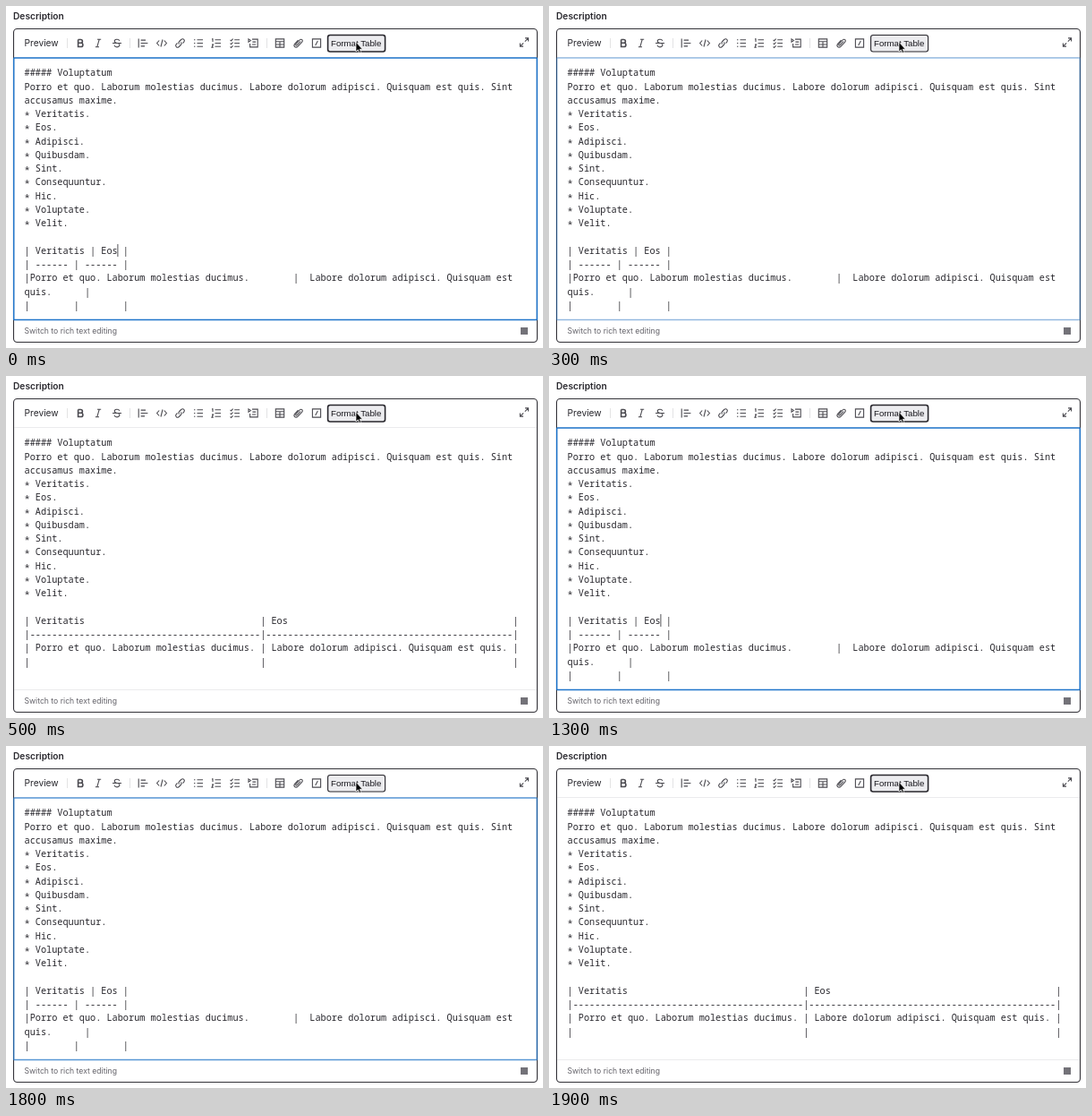
An HTML page that plays this animation: 600 by 382 pixels, repeating every 2.4 s.

```html
<!DOCTYPE html>
<html lang="en">
<head>
<meta charset="utf-8">
<title>Markdown table formatting</title>
<style>
html, body { margin: 0; width: 100%; height: 100%; overflow: hidden; background: #fff; }
svg { display: block; width: 600px; height: 382px; }
text { white-space: pre; }
.ui { font-family: Inter, sans-serif; fill: #28272d; }
.mono { font-family: "Noto Sans Mono", "DejaVu Sans Mono", monospace; font-size: 10.22px; fill: #28272d; }
.icons { fill: none; stroke: #4c4b51; stroke-width: 1.1; }
</style>
</head>
<body>
<svg viewBox="0 0 600 382">
  <rect width="600" height="382" fill="#fff"/>
  <text class="ui" x="8" y="15.2" font-size="10.2" font-weight="600">Description</text>
  <rect x="8.5" y="25.5" width="585" height="350" rx="4" fill="#fff" stroke="#333238" stroke-width="1.1"/>
  <path d="M9 57.5H593M9 350.5H593" stroke="#e6e6e9" stroke-width=".8"/>
  <text class="ui" x="20.5" y="45.2" font-size="10.2">Preview</text>
  <path d="M68.5 36V47M138.5 36V47M291.5 36V47" stroke="#dcdcde" stroke-width=".8"/>
  <g class="icons" id="icons"></g>
  <rect id="button" x="359.6" y="32.5" width="64" height="18.5" rx="2.5" fill="#ececef" stroke="#28272d"/>
  <text x="363" y="45.2" font-size="9.7" font-family="Liberation Sans, Arial, sans-serif" fill="#18171d">Format Table</text>
  <path d="M391 40.3V51L393.4 48.8L395 52.4L396.7 51.6L395.2 48.2H398.3Z" fill="#000" stroke="#fff" stroke-width=".7"/>
  <g class="mono" id="body"></g>
  <g class="mono" id="raw"></g>
  <g class="mono" id="formatted"></g>
  <path id="caret" d="M124.9 266V280" stroke="#28272d" stroke-width=".8"/>
  <rect id="ring" x="8.7" y="58.1" width="584.6" height="292.4" rx=".8" fill="none" stroke="#1f75cb" stroke-width="1.5"/>
  <text class="ui" x="20.5" y="366.3" font-size="8.65" style="fill:#626168">Switch to rich text editing</text>
  <rect x="575" y="359" width="8" height="8" fill="#737278"/>
</svg>
<script>
const $ = id => document.getElementById(id);
const make = (parent, tag, attrs, content = "") => {
  const node = document.createElementNS("http://www.w3.org/2000/svg", tag);
  for (const key in attrs) node.setAttribute(key, attrs[key]);
  node.textContent = content;
  parent.append(node);
};

// Icons are drawn around their own centre.
const bars = "M-1.5 -3.8H5M-1.5 0H5M-1.5 3.8H5";
const icons = [
  [83, "M-2.4 -4V4H.8A2.1 2.1 0 0 0 .8 -.2H-2.4M.5 -.2A1.9 1.9 0 0 0 .5 -4H-2.4", 1.6],
  [103, "M-1 -4.2H3.2M-3.2 4.2H1M1.2 -4.2L-1.2 4.2"],
  [124, "M2.8 -2.6C2 -5 -2.8 -4.8 -2.8 -2.2C-2.8 -.6 -1 -.2 0 0M-5 0H5M1.8 .4C4.3 2.4 2 4.4 0 4.4C-1.6 4.4 -2.6 3.6 -3 2.4"],
  [153, "M-4.8 -5V5M-2.4 -3.4H3M-2.4 0H5.4M-2.4 3.4H2"],
  [174, "M-2.8 -3L-5.4 0L-2.8 3M2.8 -3L5.4 0L2.8 3M1 -4L-1 4"],
  [194.5, "M-1 1.2C-2 0 -1.8 -1 -.8 -2L1.2 -4C3.6 -6 6 -3 4.2 -1.2L3 0M1 -1.2C2 0 1.8 1 .8 2L-1.2 4C-3.6 6 -6 3 -4.2 1.2L-3 0"],
  [215, bars + "M-5 -3.8H-3.6M-5 0H-3.6M-5 3.8H-3.6"],
  [235, bars + "M-5 -4.6H-4V-1.6M-5 1.6H-3.4L-5 4.6H-3.2"],
  [256, "M-.8 -3.8H5M-.8 0H5M-.8 3.8H5M-5.4 -3.6L-4.4 -2.6L-2.4 -4.8M-5.4 .2L-4.4 1.2L-2.4 -1M-5.4 4L-4.4 5L-2.4 2.8"],
  [276, "M-5 -4.6L-2.6 -3L-5 -1.4ZM-1 -4.4H5.2V4.4H-3.4V.4M-.6 -1.4H3.2M-1 1.5H3.2"],
  [306, "M-4.7 -4.6H4.7V4.6H-4.7ZM-4.7 -1.7H4.7M-4.7 1.5H4.7M0 -1.7V4.6"],
  [326.5, "M2.6 -2L-1.2 2.2C-2.2 3.2 -3.4 2 -2.5 1L1.6 -3.5C3.6 -5.6 6 -3.2 4.1 -1.2L-.4 3.6C-3 6.2 -6 3.2 -3.7 .6L0 -3.4"],
  [347, "M-4.6 -4.6H4.6V4.6H-4.6ZM1.3 -2.5L-1.3 2.5"],
  [579, "M1 -4.6H4.6V-1M4.4 -4.4L.8 -.8M-1 4.6H-4.6V1M-4.4 4.4L-.8 .8", 1.1, 40.5]
];
for (const [x, d, width = 1.1, y = 41.5] of icons)
  make($("icons"), "path", { d, transform: `translate(${x} ${y})`, "stroke-width": width });

function writeLines(group, lines, firstRow = 0) {
  lines.forEach((line, i) => {
    const y = 78.3 + (firstRow + i) * 15.27;
    // Bullets sit at mid height, lower than the font places them.
    if (line[0] === "*") {
      make(group, "text", { x: 20.5, y: y + 1.9 }, "*");
      line = " " + line.slice(1);
    }
    make(group, "text", { x: 20.5, y }, line);
  });
}

const bullets = ["Veritatis", "Eos", "Adipisci", "Quibusdam", "Sint",
  "Consequuntur", "Hic", "Voluptate", "Velit"];
writeLines($("body"), [
  "##### Voluptatum",
  "Porro et quo. Laborum molestias ducimus. Labore dolorum adipisci. Quisquam est quis. Sint",
  "accusamus maxime.",
  ...bullets.map(word => `* ${word}.`)
]);

const left = "Porro et quo. Laborum molestias ducimus.";
const right = "Labore dolorum adipisci. Quisquam est";
const gap = " ".repeat(8);
writeLines($("raw"), [
  "| Veritatis | Eos |",
  "| ------ | ------ |",
  `|${left}${gap}|  ${right}`,
  "quis.      |",
  `|${gap}|${gap}|`
], 13);

const row = (a, b, fill = " ") => `|${a.padEnd(42, fill)}|${b.padEnd(45, fill)}|`;
writeLines($("formatted"), [
  row(" Veritatis", " Eos"),
  row("", "", "-"),
  row(" " + left, ` ${right} quis.`),
  row("", "")
], 13);

const show = (id, on) => $(id).setAttribute("visibility", on ? "visible" : "hidden");

function render(time) {
  const t = time % 2400;
  const second = t >= 1300;
  const formatted = second ? t >= 1900 : t >= 500;
  const pressStart = second ? 1800 : 200;
  const pressed = t >= pressStart && !formatted;
  const fadeStep = pressed ? Math.floor((t - pressStart) / 100) + 1 : 0;

  show("raw", !formatted);
  show("formatted", formatted);
  show("caret", t < 100 || (second && t < 1700));
  $("ring").setAttribute("opacity", formatted ? 0 : 1 - fadeStep * 0.28);
  $("button").setAttribute("stroke-width", pressed ? 1.1 : 1.6);
}

const start = performance.now();
function tick() {
  render(performance.now() - start);
  requestAnimationFrame(tick);
}
tick();
</script>
</body>
</html>
```
